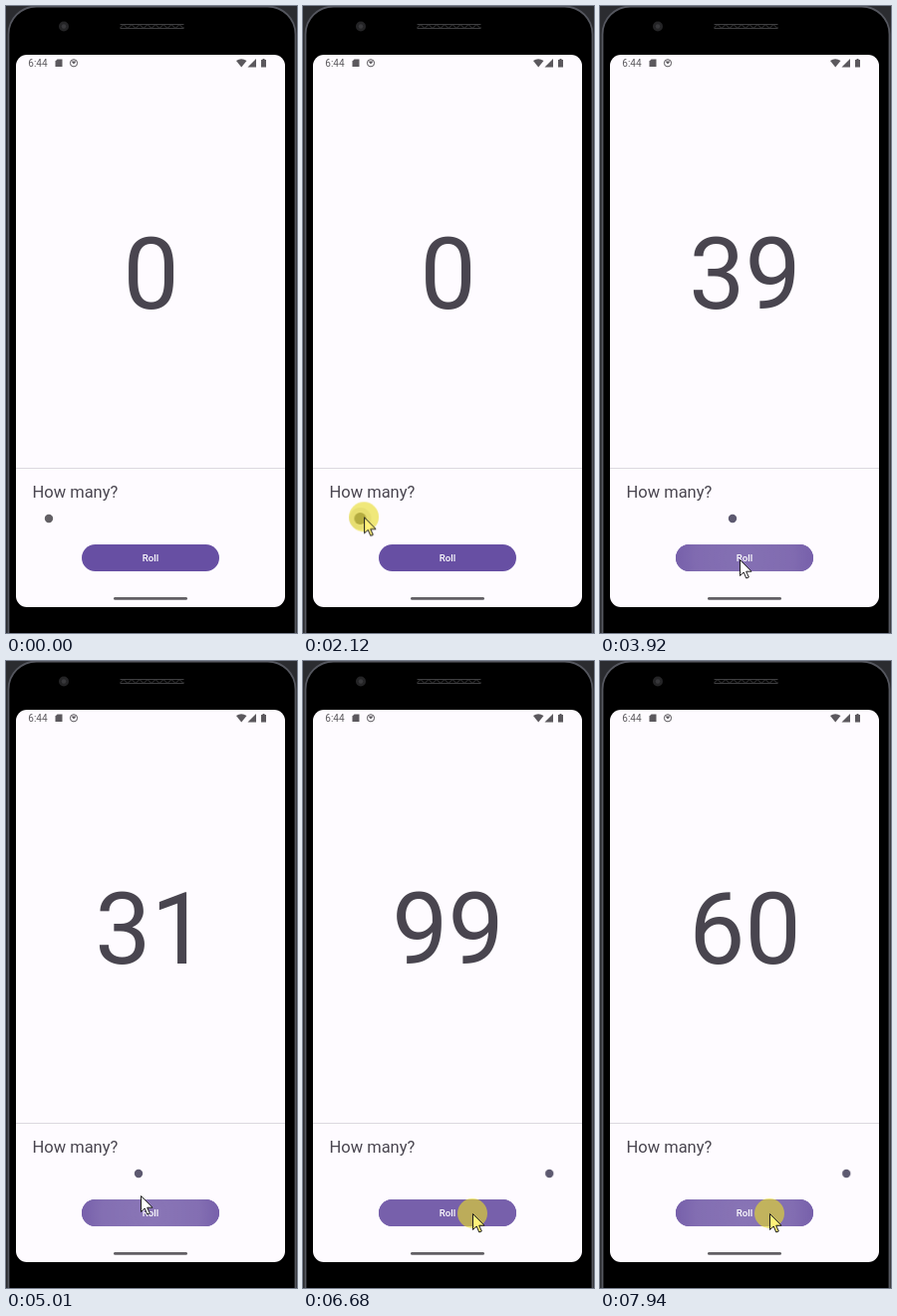
An HTML page for the animation above (8 s loop, 292 by 630 pixels).

```html
<!DOCTYPE html>
<html lang="en">
<head>
<meta charset="utf-8">
<title>Dice roller</title>
<style>
  html, body { margin: 0; width: 100%; height: 100%; overflow: hidden; background: #2b2c30; }
  svg { display: block; width: 292px; height: 630px; font-family: Roboto, sans-serif; }
  .ink { fill: #49454f; }
  .status { fill: #5b585d; }
  #cursor, #thumb, #halo, #hover { animation: 8s linear infinite; }
  #cursor { animation-name: point; }
  #thumb { animation-name: slide; }
  #halo { animation-name: halo; }
  #hover { animation-name: hover; }

  @keyframes point {
    0%, .86% { transform: translate(260px, 660px); }
    .87% { transform: translate(224px, 613px); }
    2.3%, 4.8% { transform: translate(50px, 521px); }
    8.5%, 12.5% { transform: translate(122px, 559px); }
    16%, 17% { transform: translate(77px, 529px); }
    20.5%, 25.6% { transform: translate(47px, 513px); }
    31.3%, 34.1% { transform: translate(135px, 515px); }
    36.5%, 59.5% { transform: translate(140px, 556px); }
    62.3%, 63% { transform: translate(135px, 537px); }
    67.5%, 69.1% { transform: translate(135px, 514px); }
    73.8%, 74.8% { transform: translate(277px, 515px); }
    78.5%, 100% { transform: translate(170px, 555px); }
  }
  @keyframes slide {
    0%, 25.6% { transform: translate(43px, 515px); fill: #636065; }
    31.3%, 69.1% { transform: translate(133px, 515px); fill: #5d5970; }
    72.8%, 100% { transform: translate(247.2px, 515px); fill: #5d5970; }
  }
  @keyframes halo {
    0%, 19.5% { opacity: 0; }
    20.5%, 34.5% { opacity: 1; }
    36%, 66.5% { opacity: 0; }
    67.5%, 74.5% { opacity: 1; }
    76%, 100% { opacity: 0; }
  }
  @keyframes hover {
    0%, 7% { opacity: 0; }
    8.5%, 17% { opacity: 1; }
    19%, 37% { opacity: 0; }
    38.5%, 63% { opacity: 1; }
    65%, 78% { opacity: 0; }
    79.5%, 99.9% { opacity: 1; }
    100% { opacity: 0; }
  }
</style>
</head>
<body>
<svg viewBox="0 0 292 630">
  <defs>
    <radialGradient id="glow" gradientUnits="userSpaceOnUse" cx="145" cy="555" r="70">
      <stop offset="0" stop-color="#fff" stop-opacity=".15"/>
      <stop offset=".7" stop-color="#fff" stop-opacity=".1"/>
      <stop offset="1" stop-color="#fff" stop-opacity="0"/>
    </radialGradient>
    <pattern id="mesh" width="8" height="7" x="114" y="17" patternUnits="userSpaceOnUse">
      <path d="M0 1.500H8M0 5.500H8M0 5.500L4 1.500L8 5.500" fill="none" stroke="#3e3e40"/>
    </pattern>
  </defs>

  <!-- phone -->
  <rect x="2.500" y=".5" width="288" height="660" rx="28" stroke="#55575f" stroke-width="1.800"/>
  <circle cx="58" cy="20.500" r="5" fill="#242426"/>
  <circle cx="58" cy="20.500" r="2.200" fill="#38383b"/>
  <rect x="114" y="17" width="65" height="7" rx="3.500" fill="url(#mesh)"/>
  <rect x="10" y="49" width="270" height="555" rx="11" fill="#fefbff"/>

  <!-- status bar -->
  <g class="status">
    <text x="22.300" y="61" font-size="10">6:44</text>
    <path d="M51.500 53.500H56.500V61H49.500V55.500Z"/>
    <circle cx="68" cy="57.300" r="3.600" fill="none" stroke="#5b585d"/>
    <path d="M65.500 55.500H70.500L68 58.500Z"/>
    <path d="M231 55Q236 51.500 241.500 55L236.200 61.500Z"/>
    <path d="M251 53V61.500H242.500Z"/>
    <path d="M256 54H257.500V53H259.500V54H261V61.500H256Z"/>
  </g>

  <text id="total" class="ink" x="145.500" y="303.700" font-size="100" text-anchor="middle">0</text>
  <path d="M10 464.500H280" stroke="#dcd9df"/>
  <text class="ink" x="26.500" y="493.600" font-size="16.500">How many?</text>

  <g id="thumb" fill="#636065">
    <g id="halo">
      <circle r="11" fill="#e6e3e8"/>
      <circle r="6"/>
    </g>
    <circle r="4.200"/>
  </g>

  <!-- button -->
  <rect x="76" y="541" width="138" height="27" rx="13.500" fill="#674fa3"/>
  <rect id="hover" x="76" y="541" width="138" height="27" rx="13.500" fill="#7760ab"/>
  <rect id="ripple" x="76" y="541" width="138" height="27" rx="13.500" fill="url(#glow)" opacity="0"/>
  <text x="145" y="558" font-size="9.600" font-weight="500" letter-spacing=".07" text-anchor="middle" fill="#fff">Roll</text>
  <rect x="108" y="594" width="74" height="2.800" rx="1.400" fill="#625f64"/>

  <g id="cursor">
    <circle id="press" r="15" fill="#e6dc28" fill-opacity=".62" visibility="hidden"/>
    <path id="arrow" d="M.5 .5V16.500L4.200 13L6.800 19L9.300 18L6.700 12.200H12Z" fill="#fff" stroke="#1c1c1c"/>
  </g>
</svg>
<script>
  const LOOP = 8000, HOLD = 110, ROLL_DELAY = 65, FADE = 600;
  // [press time, rolled total]
  const rolls = [
    [3200, 14], [3500, 27], [3800, 39], [4100, 22], [4400, 18], [4650, 31],
    [6600, 99], [6920, 46], [7240, 73], [7560, 28], [7870, 60]
  ];
  const drags = [[1700, 2560], [5470, 5960]];
  const presses = [...rolls.map(([t]) => [t, t + HOLD]), ...drags];
  const [total, ripple, press, arrow] =
    ['total', 'ripple', 'press', 'arrow'].map(id => document.getElementById(id));
  const clamp = x => Math.max(0, Math.min(1, x));
  const glow = age => clamp((age - HOLD) / 90) * clamp((FADE - age) / 250);

  function draw(now) {
    const t = now % LOOP;
    const rolled = rolls.filter(([at]) => t >= at + ROLL_DELAY).pop();
    const value = String(rolled ? rolled[1] : 0);
    if (total.textContent !== value) total.textContent = value;

    ripple.setAttribute('opacity', Math.max(...rolls.map(([at]) => glow(t - at))));

    const down = presses.some(([from, to]) => t >= from && t < to);
    press.setAttribute('visibility', down ? 'visible' : 'hidden');
    arrow.setAttribute('fill', down ? '#fff27a' : '#fff');
    requestAnimationFrame(draw);
  }
  requestAnimationFrame(draw);
</script>
</body>
</html>
```
